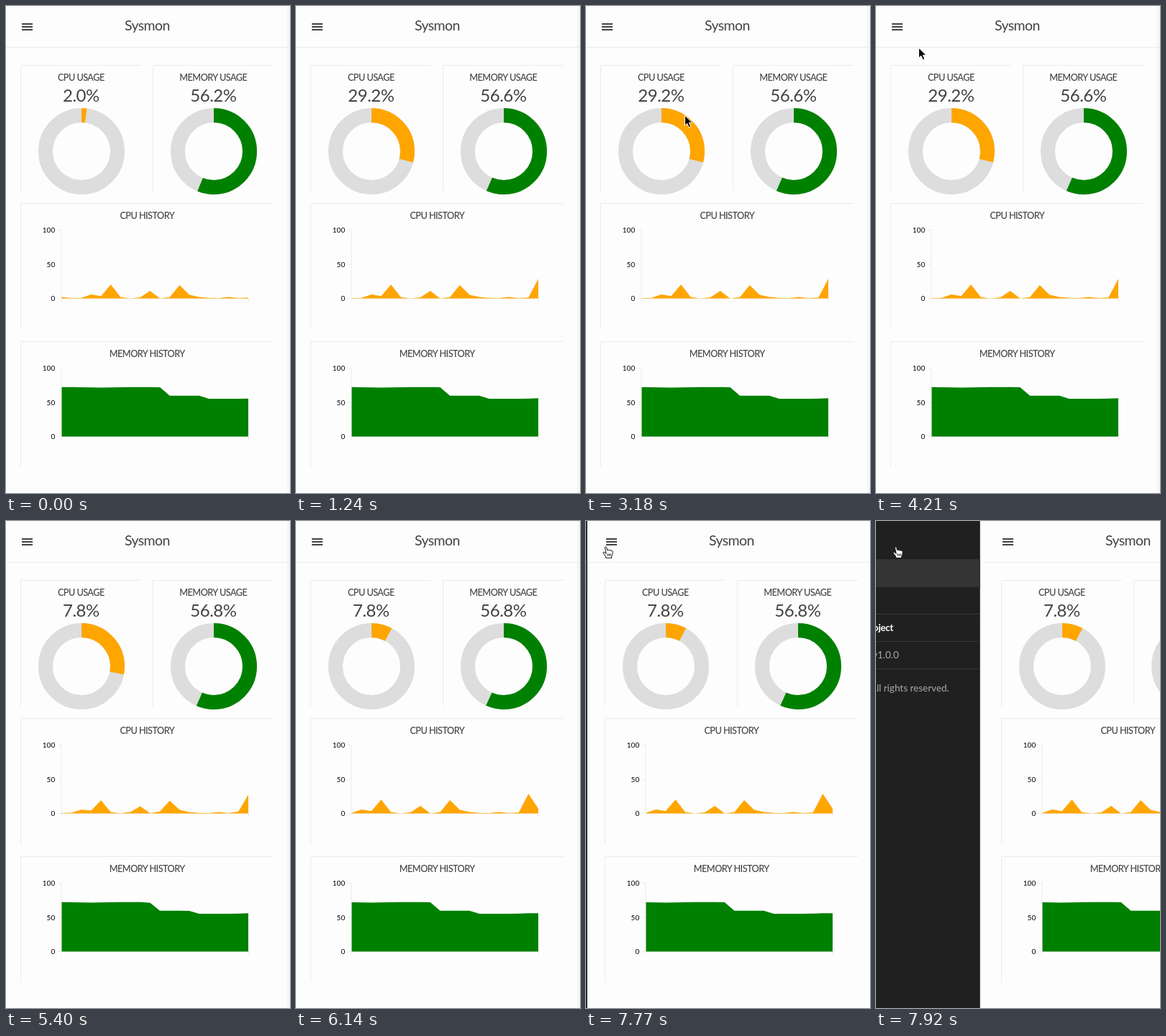
These frames come from a looping animation (395 by 677 pixels, 8 s). An HTML page:

```html
<!DOCTYPE html>
<html lang="en">
<head>
<meta charset="utf-8">
<title>Sysmon</title>
<style>
  html, body { margin: 0; width: 100%; height: 100%; overflow: hidden; background: #fdfdfd; }
  svg { display: block; width: 100vw; height: 100vh; font-family: Lato, "Open Sans", sans-serif; }
  text { fill: #444; text-anchor: middle; }
  .brand { font-size: 19.5px; letter-spacing: -.6px; }
  .title { font-size: 12.7px; letter-spacing: -.55px; font-weight: 500; }
  .value { font-size: 24px; letter-spacing: -.5px; }
  .label { font-size: 10px; fill: #000; text-anchor: end; }
  .rule, .axis { fill: none; stroke: #ebebeb; }
  .ring { fill: none; stroke-width: 20; }
  .side text { font-size: 13.5px; fill: #aaa; text-anchor: end; }
  .side .strong { fill: #fff; font-weight: 700; letter-spacing: -.4px; }
</style>
</head>
<body>
<svg viewBox="0 0 395 677">
  <rect width="395" height="677" fill="#fdfdfd"/>
  <g id="page">
    <rect x="391" width="8" height="677" fill="#f5f5f5"/>
    <path class="rule" d="M-3 57.5H395"/>
    <path d="M22 25H37M22 29H37M22 33H37" stroke="#444" stroke-width="2"/>
    <text class="brand" x="196.3" y="34">Sysmon</text>
  </g>
  <g id="side" class="side">
    <rect x="-395" width="395" height="677" fill="#202020"/>
    <rect x="-395" y="53" width="395" height="39" fill="#343434"/>
    <path d="M-395 129.5H0M-395 167.5H0M-395 205.5H0" stroke="#393939"/>
    <text class="strong" x="-121" y="153">Project</text>
    <text x="-113" y="191">Sysmon v1.0.0</text>
    <text x="-43" y="237">All rights reserved.</text>
  </g>
  <path id="arrow" d="M1.5 1.2V15.2L4.7 12.2L7.1 17.7L9.6 16.6L7.3 11.2H11.8Z" stroke="#fff"/>
  <path id="hand" d="M5.2 10.5L3 8.6C1.6 7.5 .2 8.6 1.3 10.1L4.5 14.3V16.3H12.6V14.2C13.8 12.3 14.2 10.4 14.1 7.4C14 5.6 12 5.5 11.8 6.9C11.6 5 9.6 4.8 9.3 6.2C9 4.7 7.1 4.6 6.8 5.8L5.6 1.9C5.1 .3 3 .7 3.4 2.5ZM7.4 10.5V13.5M9.4 10.5V13.5M11.3 10.5V13.5" fill="#fff" stroke="#111" stroke-linejoin="round"/>
</svg>
<script>
const LOOP = 8000, STEP = 148, POINTS = 20;
const UPDATES = [500, 5400], UPDATE_STEPS = 6;
const DRAWER_START = 7770, HOVER_START = 7480;
const $ = id => document.getElementById(id);
const page = $('page');

function add(tag, attrs, text = '') {
  const el = document.createElementNS('http://www.w3.org/2000/svg', tag);
  for (const key in attrs) el.setAttribute(key, attrs[key]);
  el.textContent = text;
  return page.appendChild(el);
}

const card = (x, y, w, h) => add('path', { class: 'rule', d: `M${x + .5} ${y + h}V${y + .5}H${x + w}` });

function gauge(x, name, color) {
  card(x, 82, 168, 176);
  const cx = x + 85;
  add('text', { class: 'title', x: cx - .7, y: 104 }, name);
  const value = add('text', { class: 'value', x: cx - .6, y: 133 });
  const ring = { class: 'ring', cx, cy: 202, r: 50 };
  add('circle', { ...ring, stroke: '#ddd' });
  const arc = add('circle', { ...ring, stroke: color, pathLength: 100, transform: `rotate(-90 ${cx} 202)` });
  return (shown, drawn) => {
    value.textContent = shown.toFixed(1) + '%';
    arc.setAttribute('stroke-dasharray', `${drawn} 100`);
  };
}

function chart(y, name, color) {
  card(20, y, 352, 175);
  add('text', { class: 'title', x: 196.3, y: y + 22 }, name);
  const base = y + 132.5, height = 95;
  add('path', { class: 'axis', d: `M72 ${base}H337.5v5M77 ${base + 5}V${base - height}h-5M72 ${base - height / 2}h5` });
  for (const v of [0, 50, 100]) add('text', { class: 'label', x: 68.2, y: base + 3.6 - v * height / 100 }, v);
  const area = add('path', { fill: color });
  return values => {
    const line = values.map((v, i) => `L${77.5 + i * 259.5 / (POINTS - 1)} ${base + .6 - v * height / 100}`);
    area.setAttribute('d', `M77.5 ${base}${line.join('')}V${base}Z`);
  };
}

// CPU load: an idle ripple with bursts at a few samples
const bursts = { 3: 6.3, 4: 4, 5: 21, 9: 11.8, 12: 20, 13: 6, 19: 2, 20: 29.2, 21: 7.8 };
const cpu = i => bursts[i] ?? 1.7 + Math.cos(i * Math.PI * 12 / 17);

// Memory: three plateaus, the last one creeping up
function memory(i) {
  if (i < 11) return 72.7 + .4 * Math.cos(i * Math.PI / 4);
  if (i < 15) return 60.3;
  const left = POINTS + 1 - i;
  return Math.max(56, 56.8 - left * (left + 1) / 10);
}

const series = [
  { sample: cpu, gauge: gauge(20, 'CPU USAGE', 'orange'), chart: chart(274, 'CPU HISTORY', 'orange') },
  { sample: memory, gauge: gauge(204, 'MEMORY USAGE', 'green'), chart: chart(466, 'MEMORY HISTORY', 'green') }
];

// Pointer sweeps; the pointer rests where each one ends
const sweeps = [
  { start: 2580, steps: 5, from: [303, 387], to: [136, 151] },
  { start: 3470, steps: 4, from: [128, 141], to: [62, 63] },
  { start: 4210, steps: 5, from: [58, 57], to: [400, 26] },
  { start: 6740, steps: 1, from: [175, 53], to: [175, 53] },
  { start: 7030, steps: 4, from: [195, 378], to: [23, 35] }
];

const mix = (a, b, p) => a + (b - a) * p;
const easeInOut = p => p < .5 ? 2 * p * p : 1 - 2 * (1 - p) ** 2;
const easeOut = p => 1 - (1 - p) ** 1.5;
const stepsSince = (t, start) => Math.floor((t - start) / STEP);

function place(el, pos) {
  el.style.display = pos ? '' : 'none';
  if (pos) el.setAttribute('transform', `translate(${pos})`);
}

function pointerAt(t) {
  const s = sweeps.findLast(s => s.start <= t);
  if (!s) return null;
  const p = s.steps > 1 ? easeOut(Math.min(1, stepsSince(t, s.start) / (s.steps - 1))) : 1;
  return s.from.map((v, axis) => mix(v, s.to[axis], p));
}

function render(t) {
  const done = UPDATES.filter(start => start <= t);
  const from = Math.max(0, done.length - 1);
  const p = done.length ? easeInOut(Math.min(1, (stepsSince(t, done[from]) + 1) / UPDATE_STEPS)) : 0;
  for (const s of series) {
    const values = Array.from({ length: POINTS }, (_, i) => mix(s.sample(i + from), s.sample(i + from + 1), p));
    s.gauge(s.sample(POINTS - 1 + done.length), values[POINTS - 1]);
    s.chart(values);
  }

  const shift = t < DRAWER_START ? 0 : 6 + 148 * stepsSince(t, DRAWER_START);
  place(page, [shift, 0]);
  place($('side'), [shift * .966 - 4, 0]);

  const pos = pointerAt(t), hover = t >= HOVER_START;
  place($('arrow'), hover ? null : pos);
  place($('hand'), hover ? pos : null);
}

const begin = performance.now();
function tick() {
  render((performance.now() - begin) % LOOP);
  requestAnimationFrame(tick);
}
render(0);
requestAnimationFrame(tick);
</script>
</body>
</html>
```
